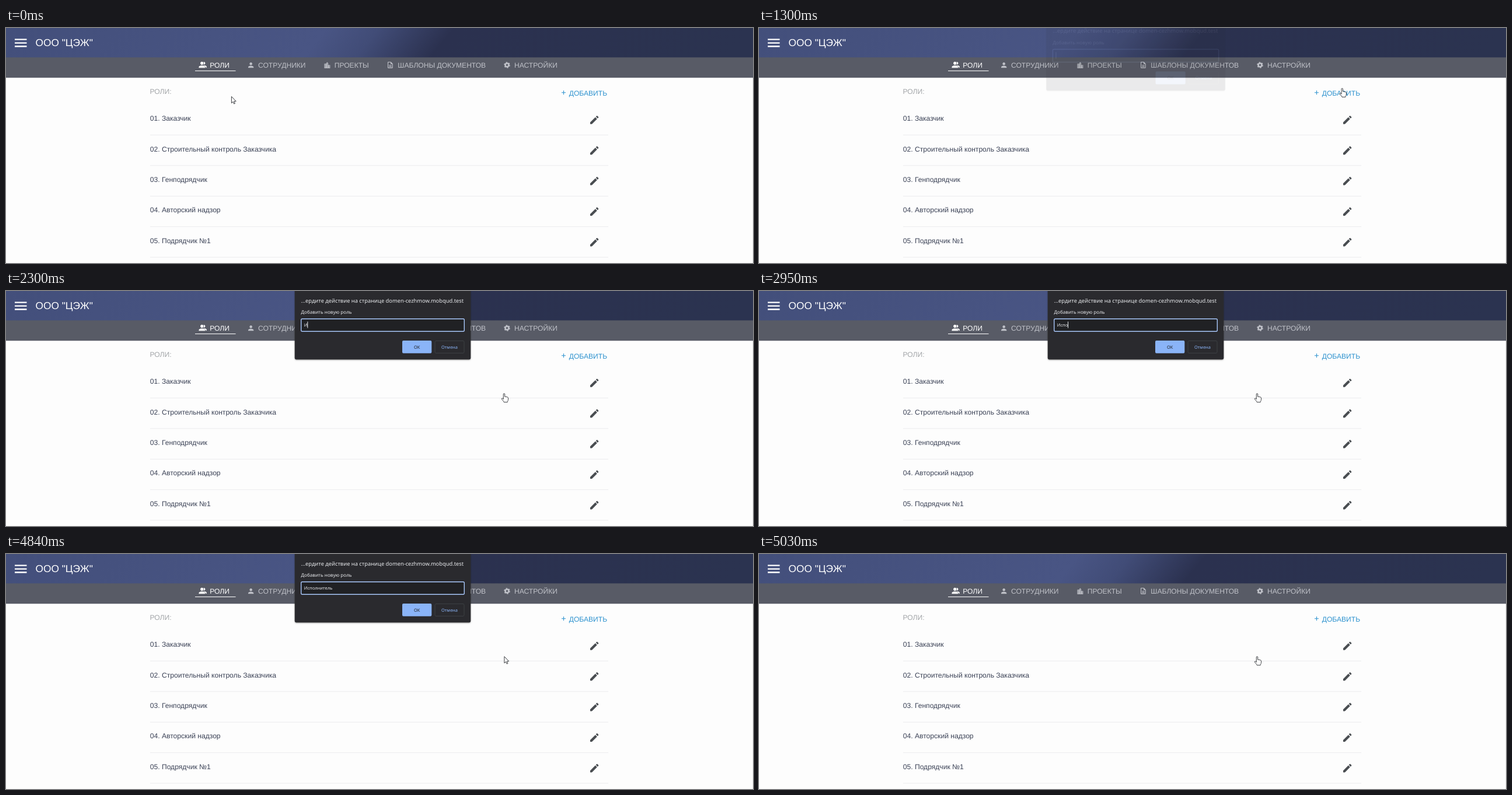
Write an HTML page that moves like this. It is 1280 px wide and 403 px high and loops after 5.95 s.

```html
<!DOCTYPE html>
<html lang="ru">
<head>
<meta charset="utf-8">
<title>Роли</title>
<style>
  html, body { margin: 0; width: 100%; height: 100%; overflow: hidden; background: #fdfdfd; }
  svg { display: block; }
  text { font: 12.1px "Liberation Sans", Arial, sans-serif; white-space: pre; text-rendering: geometricPrecision; }
  #dialog text { font: 7.45px "Noto Sans", "Open Sans", sans-serif; fill: #e8eaed; }
  #nav { fill: #bfc1c8; }
</style>
</head>
<body>
<svg width="1280" height="403" viewBox="0 0 1280 403">
  <defs>
    <linearGradient id="sky" gradientUnits="userSpaceOnUse" x1="0" y1="0" x2="780" y2="624">
      <stop offset="0" stop-color="#434f7b"/>
      <stop offset=".43" stop-color="#495584"/>
      <stop offset=".5" stop-color="#414c77"/>
      <stop offset=".6" stop-color="#2b314f"/>
      <stop offset="1" stop-color="#2b3350"/>
    </linearGradient>
    <filter id="shadow" x="-10%" y="-10%" width="120%" height="130%">
      <feDropShadow dx="0" dy="1" stdDeviation="1.2" flood-opacity=".35"/>
    </filter>
    <path id="person" d="M12 12c2.2 0 4-1.8 4-4s-1.8-4-4-4-4 1.8-4 4 1.8 4 4 4zm0 2c-2.7 0-8 1.3-8 4v2h16v-2c0-2.7-5.3-4-8-4z"/>
    <path id="pencil" d="M3 17.25V21h3.75L17.8 9.94l-3.75-3.75zM20.7 7.04c.4-.4.4-1 0-1.4l-2.35-2.35c-.4-.4-1-.4-1.4 0l-1.83 1.83 3.75 3.75z"/>
  </defs>

  <rect width="1280" height="403" fill="#fdfdfd"/>
  <rect x="1279" width="1" height="403" fill="#f0f0f1"/>
  <rect width="1280" height="51" fill="url(#sky)"/>
  <rect y="50.4" width="1280" height="34.9" fill="#585b66"/>

  <path d="M15 19.7h20.5M15 25.6h20.5M15 31.5h20.5" stroke="#fff" stroke-width="2.3"/>
  <text x="50.5" y="31" style="font-size:17.3px" fill="#fff">ООО "ЦЭЖ"</text>

  <g id="nav">
    <g fill="#fff">
      <use href="#person" transform="translate(331.5 55.4) scale(.62)"/>
      <use href="#person" transform="translate(327.8 55.1) scale(.66)" stroke="#585b66" stroke-width="2" paint-order="stroke"/>
      <text x="349.3" y="68.3">РОЛИ</text>
      <rect x="324" y="73" width="69.5" height="1"/>
    </g>
    <use href="#person" transform="translate(412.7 56.7) scale(.58)"/>
    <text x="432" y="68.3">СОТРУДНИКИ</text>
    <path transform="translate(543.8 57.4) scale(.55)" fill-rule="evenodd"
      d="M15 11V5l-3-3-3 3v2H3v14h18V11zM5 9h2v2H5zm0 4h2v2H5zm0 4h2v2H5zm6-12h2v2h-2zm0 4h2v2h-2zm0 4h2v2h-2zm0 4h2v2h-2zm6-4h2v2h-2zm0 4h2v2h-2z"/>
    <text x="562.7" y="68.3">ПРОЕКТЫ</text>
    <path transform="translate(651.8 56.8) scale(.55)" fill-rule="evenodd"
      d="M8 16h8v2H8zm0-4h8v2H8zM14 2H6c-1.1 0-2 .9-2 2v16c0 1.1.9 2 2 2h12c1.1 0 2-.9 2-2V8zm4 18H6V4h7v5h5z"/>
    <text x="671.3" y="68.3">ШАБЛОНЫ ДОКУМЕНТОВ</text>
    <g fill="none" stroke="#bfc1c8">
      <circle cx="858.5" cy="63.5" r="3" stroke-width="2.6"/>
      <circle cx="858.5" cy="63.5" r="4.6" stroke-width="1.4" stroke-dasharray="2.41 2.41"/>
    </g>
    <text x="871" y="68.3">НАСТРОЙКИ</text>
  </g>

  <text x="246.5" y="112.8" fill="#a2a5a8">РОЛИ:</text>
  <path d="M952 110.7h7M955.5 107.2v7" stroke="#2f93cf" stroke-width="1.1"/>
  <text x="964.7" y="115.5" fill="#2f93cf">ДОБАВИТЬ</text>
  <g id="rows"></g>

  <rect id="dim" width="1280" height="403" opacity="0"/>

  <g id="dialog">
    <path d="M494.7-20h301.6V114.6q0 3-3 3h-295.6q-3 0-3-3z" fill="#292a2d" filter="url(#shadow)"/>
    <text x="505.5" y="20" style="font-size:9.3px">...ердите действие на странице domen-cezhmow.mobqud.test</text>
    <text x="505.5" y="39" style="font-size:8.05px">Добавить новую роль</text>
    <rect x="505.7" y="47.7" width="279.6" height="21.6" rx="2" fill="#202124" stroke="#a8c7fa" stroke-width="1.4"/>
    <text id="entry" x="510.8" y="61"></text>
    <rect id="caret" y="52.5" width="1" height="11" fill="#e8eaed"/>
    <rect x="679" y="85" width="50.3" height="21.8" rx="2" fill="#8ab4f8"/>
    <text x="704.2" y="98.7" text-anchor="middle" style="fill:#202124">ОК</text>
    <rect x="735" y="85.5" width="50" height="21" rx="2" fill="none" stroke="#3c4043"/>
    <text x="760" y="98.7" text-anchor="middle" style="fill:#8ab4f8">Отмена</text>
  </g>

  <g id="cursor" fill="#fff" stroke="#25272c" stroke-width=".9" stroke-linejoin="round">
    <path id="arrow" d="M.4.5v11.3l2.6-2.4 1.6 3.7 1.8-.8-1.6-3.6h3.4z"/>
    <path id="hand" d="M-1.2 1.7a1.2 1.2 0 0 1 2.4 0v4.2c3 .2 5.8.6 5.8 2.1v3c0 2-1.3 2.5-1.3 4.4h-6c0-1.8-3.2-3.8-3.8-5.6-.3-1 .9-1.7 1.7-.8l1.2 1.3z"/>
  </g>
</svg>
<script>
const LOOP = 5950;
const $ = id => document.getElementById(id);
const clamp = v => Math.min(1, Math.max(0, v));
const smooth = u => u * u * (3 - 2 * u);
const show = (id, on) => $(id).setAttribute('visibility', on ? 'inherit' : 'hidden');

const roles = ['Заказчик', 'Строительный контроль Заказчика', 'Генподрядчик', 'Авторский надзор', 'Подрядчик №1'];
$('rows').innerHTML = roles.map((role, i) => `<g transform="translate(0 ${i * 52.4})">
  <text x="246.8" y="159.3" fill="#3b4256">0${i + 1}. ${role}</text>
  <use href="#pencil" transform="translate(998.6 148) scale(.8)" fill="#494d51"/>
  <rect x="247" y="183" width="785" height="1" fill="#ebecee"/></g>`).join('');

const word = 'Исполнитель';
const keyTimes = [2300, 2610, 2820, 2950, 3280, 3500, 3630, 3760, 3970, 4070, 4300];

// Point on a Bezier curve of any degree
function bezier(points, u) {
  while (points.length > 1)
    points = points.slice(1).map((q, i) => q.map((v, k) => points[i][k] * (1 - u) + v * u));
  return points[0];
}

function cursorAt(t) {
  if (t < 620) {
    const u = clamp((t - 10) / 610);
    return bezier([[386, 117], [480, 183], [700, 187], [906, 102]], (u + smooth(u)) / 2);
  }
  if (t < 1330) {
    const u = clamp((t - 620) / 330);
    return bezier([[906, 102], [950, 82], [999.3, 103]], 1 - (1 - u) ** 2);
  }
  return bezier([[999.3, 103], [853.5, 175.3]], smooth(clamp((t - 1330) / 260)));
}

// Dialog presence, changing every 30 ms while it opens and closes
function presence(t) {
  if (t < 1300 || t >= 5030) return 0;
  if (t < 4880) return clamp((Math.floor((t - 1300) / 30) + .5) / 6);
  return (Math.ceil((5030 - t) / 30) - .5) / 6;
}

function draw(t) {
  const p = presence(t), away = (1 - p) / .917;
  const scale = 1 + .0166 * away;
  $('dialog').setAttribute('opacity', p);
  $('dialog').setAttribute('transform',
    `translate(${645.5 * (1 - scale)} ${-12 * away}) scale(${scale})`);

  const entry = $('entry');
  entry.textContent = word.slice(0, keyTimes.filter(k => t >= k).length);
  const width = entry.textContent ? entry.getComputedTextLength() : 0;
  $('caret').setAttribute('x', 510.6 + width);
  show('caret', t < 1790 || (t >= 2300 && t < 4840));

  const dim = t < 5030 ? Math.max(0, Math.floor((t - 4880) / 30)) / 40 : 0;
  $('dim').setAttribute('opacity', dim);

  const [x, y] = cursorAt(t);
  const hand = x > 945 || (t > 1300 && (t < 4840 || t >= 4910));
  $('cursor').setAttribute('transform', `translate(${x} ${y})`);
  show('hand', hand);
  show('arrow', !hand);
}

function tick() {
  draw(performance.now() % LOOP);
  requestAnimationFrame(tick);
}
tick();
</script>
</body>
</html>
```
